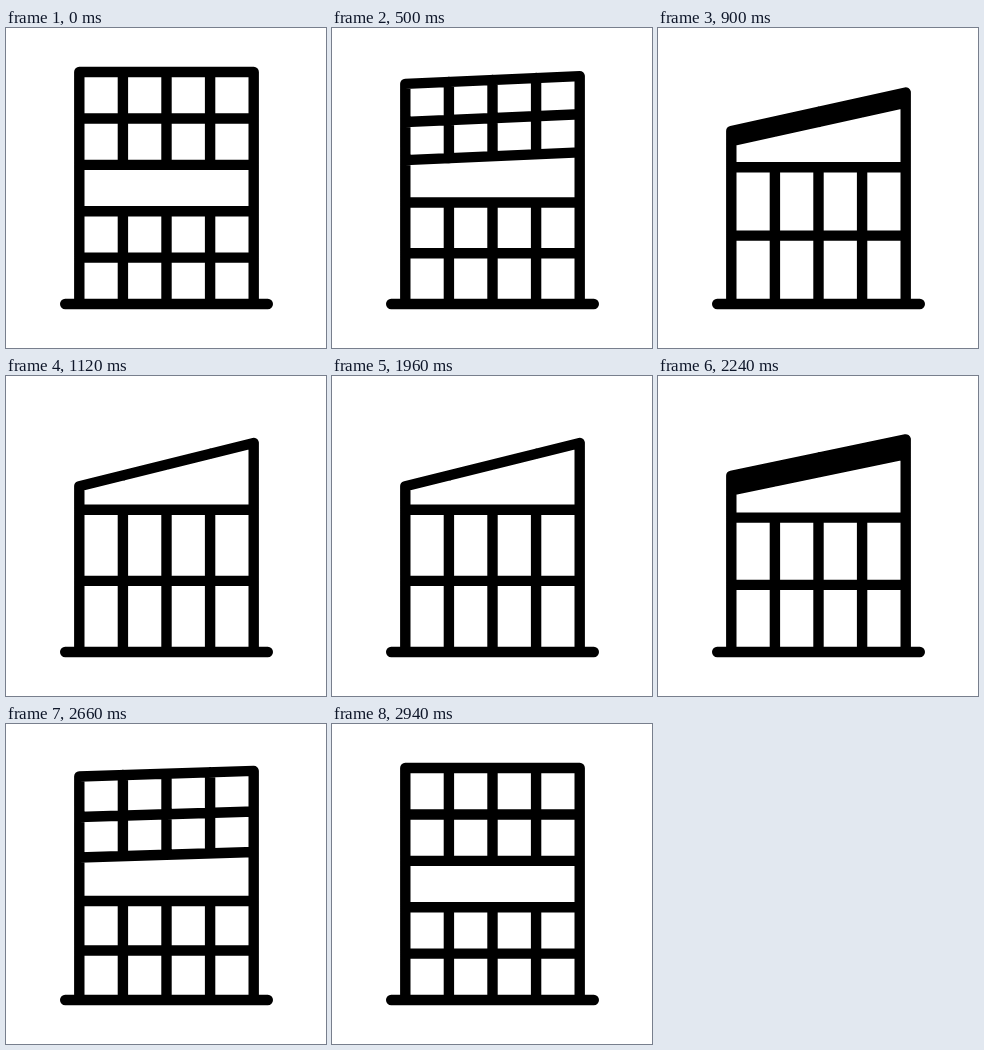
Animation, 320 px wide and 320 px high, one loop 3.56 s. Source, as an HTML page with a canvas:

```html
<!DOCTYPE html>
<html lang="en">
<head>
<meta charset="utf-8">
<title>Building</title>
<style>
html, body { margin: 0; width: 100%; height: 100%; overflow: hidden; background: #fff; }
canvas { display: block; width: 320px; height: 320px; }
</style>
</head>
<body>
<canvas id="stage"></canvas>
<script>
const LOOP = 3560, STEP = 20;
const FOLD = [208, 1136], UNFOLD = [1948, 2925];
const GROUND = 276, LEFT = 73.3, RIGHT = 247.7;
const COLS = [0.25, 0.5, 0.75];

const canvas = document.getElementById('stage');
const ctx = canvas.getContext('2d');
const scale = window.devicePixelRatio || 1;
canvas.width = canvas.height = Math.round(320 * scale);

const mix = (a, b, p) => a + (b - a) * p;

// cubic-bezier(.5, 0, .5, 1), solved by bisection
function ease(x) {
  if (x <= 0) return 0;
  if (x >= 1) return 1;
  let lo = 0, hi = 1;
  for (let i = 0; i < 24; i++) {
    const s = (lo + hi) / 2;
    if (1.5 * s * (1 - s) + s * s * s < x) lo = s; else hi = s;
  }
  return lo * lo * (3 - 2 * lo);
}

const phase = (t, [start, end]) => ease((t - start) / (end - start));

function line(x1, y1, x2, y2) {
  ctx.moveTo(x1, y1);
  ctx.lineTo(x2, y2);
}

function draw(t) {
  const p = phase(t, FOLD) - phase(t, UNFOLD);
  const roofL = mix(44, 110.3, p), roofR = mix(44, 67, p);
  const baseL = mix(136.9, 110.3, p), baseR = mix(136.9, 67, p);
  const hall = mix(183.3, 133.8, p);
  const floor = (hall + GROUND) / 2;

  ctx.setTransform(scale, 0, 0, scale, 0, 0);
  ctx.fillStyle = '#fff';
  ctx.fillRect(0, 0, 320, 320);
  ctx.strokeStyle = '#000';
  ctx.lineWidth = 10.4;
  ctx.lineCap = ctx.lineJoin = 'round';
  ctx.beginPath();

  // outer walls and roof
  ctx.moveTo(LEFT, GROUND);
  ctx.lineTo(LEFT, roofL);
  ctx.lineTo(RIGHT, roofR);
  ctx.lineTo(RIGHT, GROUND);

  // upper storeys
  line(LEFT, (roofL + baseL) / 2, RIGHT, (roofR + baseR) / 2);
  line(LEFT, baseL, RIGHT, baseR);

  // lower storeys
  line(LEFT, hall, RIGHT, hall);
  line(LEFT, floor, RIGHT, floor);

  for (const c of COLS) {
    const x = mix(LEFT, RIGHT, c);
    line(x, mix(roofL, roofR, c), x, mix(baseL, baseR, c));
    line(x, hall, x, GROUND);
  }

  line(59.2, GROUND, 261.8, GROUND);
  ctx.stroke();
}

const begin = performance.now();
function tick() {
  const t = (performance.now() - begin) % LOOP;
  draw(Math.floor(t / STEP) * STEP);
  requestAnimationFrame(tick);
}
tick();
</script>
</body>
</html>
```
